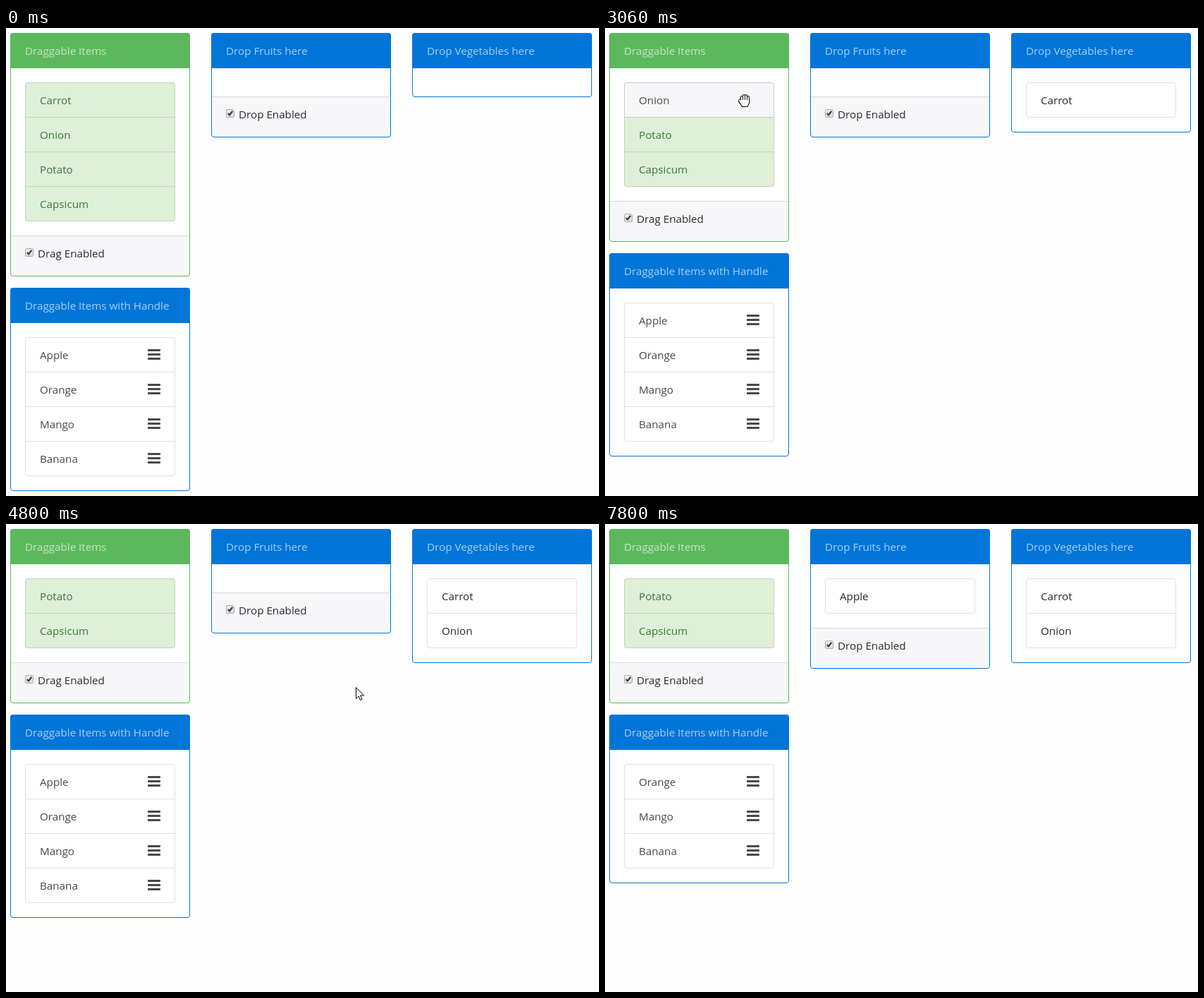
An HTML page with a canvas that plays this animation: 841x663 px, repeating every 8.22 s.

```html
<!DOCTYPE html>
<html lang="en">
<head>
<meta charset="utf-8">
<title>Drag and drop lists</title>
<style>
html, body { margin: 0; width: 100%; height: 100%; overflow: hidden; background: #fefefe; }
canvas { display: block; width: 841px; height: 663px; }
</style>
</head>
<body>
<canvas id="stage" width="841" height="663"></canvas>
<script>
const ctx = document.getElementById('stage').getContext('2d');
const LOOP = 8220, TICK = 60;
const BLUE = '#0275d8', GREEN = '#5cb85c', LINE = '#dfdfdf', INK = '#292b2c', GRAY = '#464a4c';
const PANEL_W = 255, LIST_W = 213, ROW = 49, TOP = 7;

// Pointer strokes: [ms, x, y]; the pointer rests between strokes.
const strokes = [
  [[540, 9, 60], [780, 139, 92]],
  [[1140, 139, 92], [1440, 222, 111], [1560, 319, 120], [1740, 510, 81], [1920, 658, 54], [2160, 669, 58]],
  [[2520, 669, 58], [2640, 611, 62], [2760, 370, 76], [3060, 198, 103], [3240, 143, 114]],
  [[3540, 143, 114], [3780, 266, 140], [4020, 636, 125], [4140, 719, 120]],
  [[4560, 719, 120], [4680, 670, 143], [4860, 409, 275], [5160, 240, 342], [5340, 216, 358], [5760, 209, 366]],
  [[6000, 216, 366], [6300, 254, 364], [6420, 341, 321], [6540, 443, 246], [6780, 516, 81], [7080, 510, 75]],
  [[7440, 508, 77], [7500, 512, 76], [7680, 713, 62], [7800, 850, 55]]
];

const drags = [
  { item: 'Carrot', from: 1140, to: 2520, dx: 112, dy: 15, target: 'veg' },
  { item: 'Onion', from: 3540, to: 4560, dx: 116, dy: 37, target: 'veg' },
  { item: 'Apple', from: 6000, to: 7440, dx: 191, dy: 25, target: 'fruit' }
];

function pointerAt(t) {
  if (t < 540 || t >= 7800) return null;
  const keys = strokes.filter(s => s[0][0] <= t).pop();
  const i = keys.findIndex(k => k[0] > t);
  if (i < 0) {
    const end = keys[keys.length - 1];
    return { x: end[1], y: end[2] };
  }
  const [t0, x0, y0] = keys[i - 1], [t1, x1, y1] = keys[i];
  const p = (t - t0) / (t1 - t0);
  return { x: Math.round(x0 + (x1 - x0) * p), y: Math.round(y0 + (y1 - y0) * p) };
}

const inside = (p, x, y, w, h) => p && p.x >= x && p.x < x + w && p.y >= y && p.y < y + h;

function fillBox(x, y, w, h, color, r = 0) {
  ctx.fillStyle = color;
  ctx.beginPath();
  ctx.roundRect(x, y, w, h, r);
  ctx.fill();
}

function frameBox(x, y, w, h, color, r = 0, width = 1, dash = []) {
  ctx.strokeStyle = color;
  ctx.lineWidth = width;
  ctx.setLineDash(dash);
  ctx.beginPath();
  ctx.roundRect(x + width / 2, y + width / 2, w - width, h - width, r);
  ctx.stroke();
  ctx.setLineDash([]);
}

function label(text, x, y, color) {
  ctx.font = '15.2px "Open Sans", "Noto Sans", sans-serif';
  ctx.fillStyle = color;
  ctx.fillText(text, x, y);
}

function handleIcon(x, y, color = GRAY) {
  for (let i = 0; i < 3; i++) fillBox(x, y + 6 * i, 18, 3, color, 0.7);
}

function checkbox(x, y) {
  const g = ctx.createLinearGradient(0, y, 0, y + 12);
  g.addColorStop(0, '#f0f0f0');
  g.addColorStop(1, '#dcdcdc');
  fillBox(x, y, 12, 12, g, 2);
  frameBox(x, y, 12, 12, '#a9a9a9', 2);
  ctx.strokeStyle = '#3a3a3a';
  ctx.lineWidth = 2.2;
  ctx.beginPath();
  ctx.moveTo(x + 2.8, y + 6);
  ctx.lineTo(x + 5, y + 8.4);
  ctx.lineTo(x + 9.4, y + 2.8);
  ctx.stroke();
}

const bodyHeight = n => n ? 91 + ROW * n : 90;

// Border, header and optional footer; returns the bottom edge.
function panel({ x, y, title, color, count, extra = 0, footer, dash }) {
  const s = dash ? 1 : 0;
  const split = y + bodyHeight(count) + extra + s;
  const bottom = split + (footer ? 58 : 1) + s;
  const h = bottom - y;
  fillBox(x, y, PANEL_W, h, '#fff', 4);
  if (footer) {
    fillBox(x + 1, split, PANEL_W - 2, bottom - split - 1, '#f7f7f9', [0, 0, 3, 3]);
    fillBox(x + 1, split, PANEL_W - 2, 1, '#d9d9db');
    checkbox(x + 21 + s, split + 18);
    label(footer, x + 39 + s, split + 31, INK);
  }
  if (dash) {
    fillBox(x + 2, y + 2, PANEL_W - 4, 49, color, 2);
    frameBox(x, y, PANEL_W, h, dash, 3, 2, [6, 4]);
  } else {
    fillBox(x, y, PANEL_W, 50, color, [4, 4, 0, 0]);
    frameBox(x, y, PANEL_W, h, color, 3.5);
  }
  label(title, x + 21 + s, y + 31 + s, 'rgba(255,255,255,.65)');
  return bottom;
}

function list({ x, y, w = LIST_W, items, fill = '#fff', line = LINE, ink = INK, handles, held, hover }) {
  if (!items.length) return;
  const heldRow = items.indexOf(held);
  const extra = handles && heldRow >= 0 ? 2 : 0;
  const h = ROW * items.length + 1 + extra;
  fillBox(x, y, w, h, fill, 4);
  items.forEach((item, i) => {
    const top = y + ROW * i + (i > heldRow ? extra : 0);
    const over = hover === item;
    const upper = i ? 0 : 4, lower = i < items.length - 1 ? 0 : 4;
    if (over) fillBox(x, top, w, 50, '#f7f7f9', [upper, upper, lower, lower]);
    if (i) fillBox(x, top, w, 1, line);
    if (item === held) return;
    label(item, x + 21, top + 31, over ? GRAY : ink);
    if (handles) handleIcon(x + 174, top + 17);
  });
  frameBox(x, y, w, h, line, 3.5);
  if (heldRow >= 0) heldItem(held, x, y + ROW * heldRow, handles, heldRow ? 0 : 4);
}

function heldItem(item, x, y, dashed, r = 0) {
  if (dashed) {
    fillBox(x, y, LIST_W, 52, '#eceeef', r);
    frameBox(x, y, LIST_W, 52, '#ff4f5e', Math.max(0, r - 1), 2, [6, 4]);
    label(item, x + 22, y + 32, INK);
    handleIcon(x + 173, y + 18, INK);
  } else {
    fillBox(x, y, LIST_W, 50, BLUE, [r, r, 0, 0]);
    label(item, x + 21, y + 31, '#fff');
  }
}

const cursors = {
  arrow() {
    const shape = new Path2D('M.5 .5V16.5L4.2 13L6.6 18.5L9 17.5L6.7 12H11.7Z');
    ctx.fillStyle = '#fff';
    ctx.fill(shape);
    ctx.strokeStyle = '#000';
    ctx.lineWidth = 1;
    ctx.stroke(shape);
  },
  move() {
    cursors.arrow();
    fillBox(2, 16, 13, 8, '#fff');
    frameBox(2, 16, 13, 8, '#000', 0, 1, [1, 1]);
  },
  hand() {
    const palm = new Path2D('M-4 0H5L5.5 2L3 7H-2.5L-7 .5L-6.5 -.5L-4.5 1Z');
    ctx.lineCap = ctx.lineJoin = 'round';
    for (const [color, width] of [['#000', 4], ['#fff', 2]]) {
      ctx.strokeStyle = ctx.fillStyle = color;
      ctx.lineWidth = width;
      for (let i = 0; i < 4; i++) {
        ctx.beginPath();
        ctx.moveTo(3 * i - 4, i % 3 ? -7 : -5);
        ctx.lineTo(3 * i - 4, 2);
        ctx.stroke();
      }
      ctx.fill(palm);
      ctx.stroke(palm);
    }
  },
  blocked() {
    ctx.beginPath();
    ctx.arc(0, 0, 9.8, 0, 7);
    ctx.fillStyle = '#fff';
    ctx.fill();
    ctx.strokeStyle = '#000';
    ctx.lineWidth = 2.4;
    ctx.beginPath();
    ctx.arc(0, 0, 7.6, 0, 2 * Math.PI);
    ctx.moveTo(-5.2, -5.2);
    ctx.lineTo(5.2, 5.2);
    ctx.stroke();
  }
};

function draw(t) {
  const pointer = pointerAt(t);
  const drag = drags.find(d => t >= d.from && t < d.to);
  const dropped = drags.filter(d => t >= d.to);
  const gone = dropped.map(d => d.item);
  const left = names => names.filter(n => !gone.includes(n));
  const received = id => dropped.filter(d => d.target === id).map(d => d.item);
  const held = drag && drag.item;

  const greens = left(['Carrot', 'Onion', 'Potato', 'Capsicum']);
  const grabs = left(['Apple', 'Orange', 'Mango', 'Banana']);
  const drops = [
    { id: 'fruit', x: 291, title: 'Drop Fruits here', items: received('fruit'), footer: 'Drop Enabled' },
    { id: 'veg', x: 576, title: 'Drop Vegetables here', items: received('veg') }
  ];

  ctx.fillStyle = '#fefefe';
  ctx.fillRect(0, 0, 841, 663);

  const bottom = panel({ x: 6, y: TOP, title: 'Draggable Items', color: GREEN, count: greens.length, footer: 'Drag Enabled' });
  const second = bottom + 16;
  const hovered = (items, y) => drag ? null : items.find((n, i) => inside(pointer, 27, y + ROW * i, LIST_W, ROW));
  const greenHover = hovered(greens, 77), grabHover = hovered(grabs, second + 70);

  list({ x: 27, y: 77, items: greens, fill: '#dff0d8', line: '#c3d2bd', ink: '#3c763d', held, hover: greenHover });

  panel({ x: 6, y: second, title: 'Draggable Items with Handle', color: BLUE, count: grabs.length, extra: grabs.includes(held) ? 2 : 0 });
  list({ x: 27, y: second + 70, items: grabs, ink: GRAY, handles: true, held, hover: grabHover });

  let over = false;
  for (const { id, x, title, items, footer } of drops) {
    let dash = null;
    if (drag && drag.target === id) {
      over = inside(pointer, x, TOP, PANEL_W, bodyHeight(items.length) + (footer ? 58 : 1));
      dash = over ? '#3c763d' : '#ffc107';
    }
    const s = dash ? 1 : 0;
    panel({ x, y: TOP, title, color: BLUE, count: items.length, footer, dash });
    list({ x: x + 21 + s, y: 77 + s, w: LIST_W - 2 * s, items });
  }

  if (!pointer) return;
  if (drag) {
    ctx.globalAlpha = 0.75;
    heldItem(held, pointer.x - drag.dx, pointer.y - drag.dy, grabs.includes(held));
    ctx.globalAlpha = 1;
  }
  const onHandle = grabHover && pointer.x > 196 && pointer.x < 222;
  const shape = drag ? (over ? 'move' : 'blocked') : greenHover || onHandle ? 'hand' : 'arrow';
  ctx.save();
  ctx.translate(pointer.x, pointer.y);
  cursors[shape]();
  ctx.restore();
}

const start = performance.now();
function tick() {
  const t = Math.max(0, performance.now() - start) % LOOP;
  draw(Math.floor(t / TICK) * TICK);
  requestAnimationFrame(tick);
}
tick();
</script>
</body>
</html>
```
